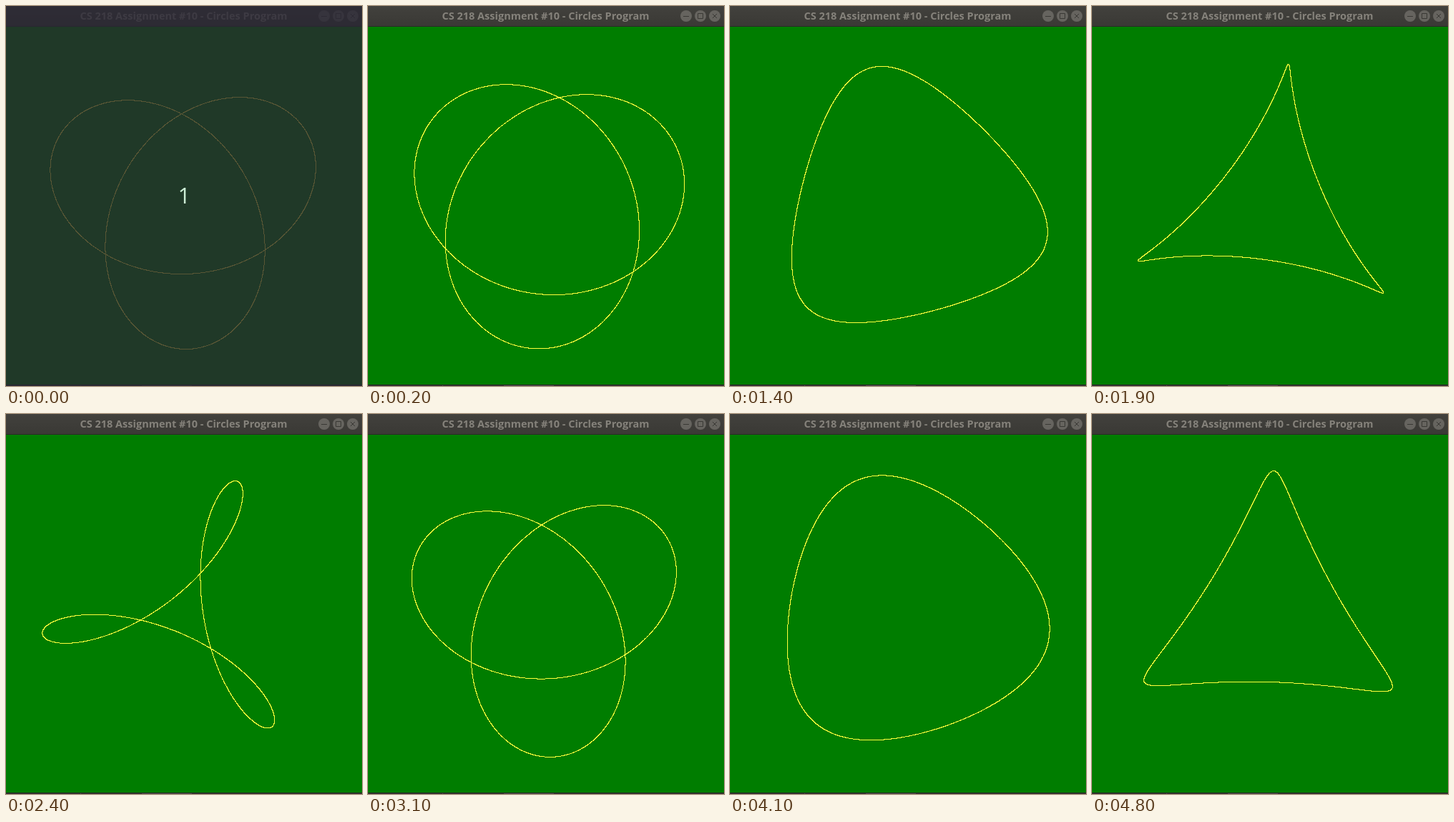
An HTML page with a canvas for the animation above (4.9 s loop, 498 by 531 pixels).

```html
<!DOCTYPE html>
<html lang="en">
<head>
<meta charset="utf-8">
<title>Circles Program</title>
<style>
  html, body { margin: 0; width: 100%; height: 100%; overflow: hidden; background: #33352f; }
  #stage { position: relative; width: 498px; height: 531px; overflow: hidden; }
  svg, canvas { position: absolute; left: 0; top: 0; display: block; }
  text { font-family: "Open Sans", "Noto Sans", sans-serif; }
  #title { font-size: 14.5px; font-weight: 700; fill: #85827b; }
  #count { font-size: 31px; fill: #cdeed6; }
  .disc { fill: #66645f; }
  .sign { fill: none; stroke: #3a3935; stroke-width: 1; }
</style>
</head>
<body>
<div id="stage">
  <svg width="498" height="531" viewBox="0 0 498 531">
    <defs>
      <linearGradient id="bar" x2="0" y2="1">
        <stop offset="0" stop-color="#42413d"/>
        <stop offset="1" stop-color="#3a3935"/>
      </linearGradient>
    </defs>
    <rect width="498" height="28" fill="url(#bar)"/>
    <rect y="28" width="498" height="1" fill="#2b2a27"/>
    <text id="title" x="248.5" y="19" text-anchor="middle">CS 218 Assignment #10 - Circles Program</text>
    <g class="disc">
      <circle cx="445" cy="14" r="8"/>
      <circle cx="465" cy="14" r="8"/>
      <circle cx="485" cy="14" r="8"/>
    </g>
    <path class="sign" d="M441 14.5h8M461.5 10.5h7v7h-7zM482 11l6 6M488 11l-6 6"/>
    <rect y="29" width="498" height="500" fill="#007d00"/>
    <rect y="529" width="498" height="1" fill="#2b2a27"/>
    <path d="M104 530.5h1M190 530.5h70" stroke="#55544f"/>
  </svg>
  <canvas id="plot" width="498" height="531"></canvas>
  <svg id="shade" width="498" height="531" viewBox="0 0 498 531">
    <rect width="498" height="531" fill="rgb(42,39,52)" fill-opacity="0.78"/>
    <text id="count" x="240.5" y="276">1</text>
  </svg>
</div>
<script>
  const LOOP = 4900, STEP = 100, SIZE = 200, CX = 249, CY = 279.5, SAMPLES = 5000;
  const START = 52.5;

  // Bursts of redraws: first time in ms, number of steps, arm length reached
  const bursts = [
    [100, 2, 38.3], [400, 3, 17], [800, 5, -14.2], [1400, 1, -24.8], [1500, 2, -50],
    [1800, 5, -81], [2400, 1, -86.7], [2500, 5, -135], [3100, 1, -145.2], [3200, 1, -152],
    [3400, 4, -188], [3900, 3, -217.5], [4300, 3, -236.5], [4700, 2, -252.5]
  ];

  const ctx = document.getElementById("plot").getContext("2d");
  const shade = document.getElementById("shade");

  function armAt(ms) {
    let arm = START;
    for (const [first, steps, end] of bursts) {
      if (ms < first) break;
      const done = Math.min(steps, Math.floor((ms - first) / STEP) + 1);
      arm += (end - arm) * done / steps;
    }
    return ((arm % SIZE) + SIZE) % SIZE;
  }

  // One arm turns once while the other turns twice the opposite way
  function drawCurve(a) {
    const b = SIZE - a;
    const turn = a / SIZE * Math.PI * 2 / 3;
    ctx.clearRect(0, 0, 498, 531);
    ctx.fillStyle = "#ffff3c";
    for (let i = 0; i < SAMPLES; i++) {
      const t = i / SAMPLES * Math.PI * 2;
      const x = a * Math.cos(turn + t) + b * Math.cos(turn - 2 * t);
      const y = a * Math.sin(turn + t) + b * Math.sin(turn - 2 * t);
      ctx.fillRect(Math.floor(CX + x), Math.floor(CY - y), 1, 1);
    }
  }

  const begin = performance.now();
  let shown = -1;

  function tick() {
    const ms = (performance.now() - begin) % LOOP;
    const arm = armAt(ms);
    if (arm !== shown) drawCurve(shown = arm);
    shade.style.visibility = ms < STEP ? "visible" : "hidden";
    requestAnimationFrame(tick);
  }
  tick();
</script>
</body>
</html>
```
